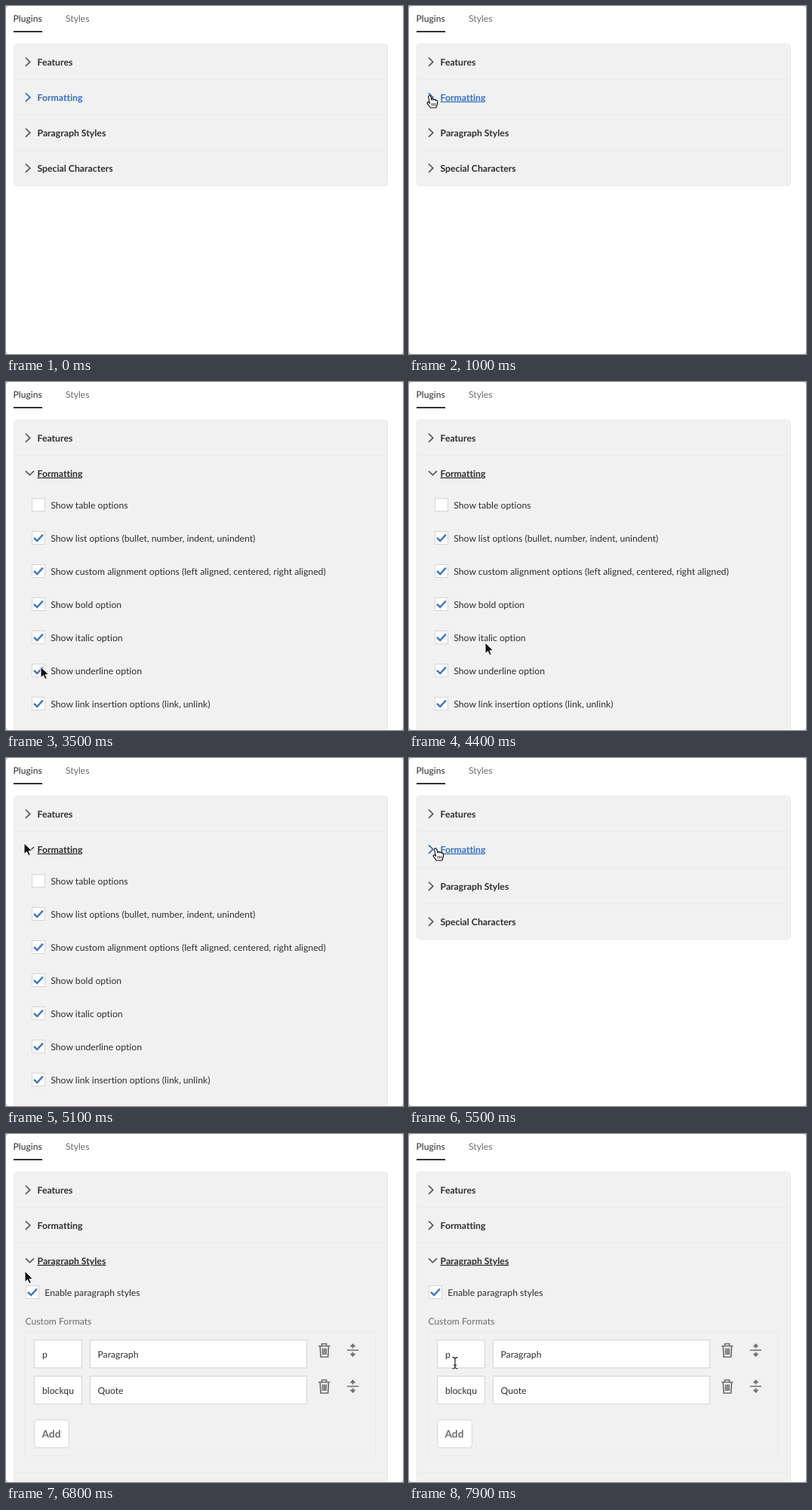
An HTML page that plays this animation: 526 px wide and 462 px high, repeating every 8 s.

```html
<!DOCTYPE html>
<html lang="en">
<head>
<meta charset="utf-8">
<title>Plugin settings</title>
<style>
  html, body { margin: 0; width: 100%; height: 100%; overflow: hidden; background: #777; }
  svg { display: block; }
  text {
    font: 12.2px Lato, "Open Sans", sans-serif; fill: #2e2e2e; white-space: pre;
    font-variant-ligatures: none; text-rendering: geometricPrecision;
  }
  .bold { font-weight: 700; }
  .muted { fill: #6e6e6e; }
  .title { font-size: 12.25px; font-weight: 700; }
  .chevron { fill: none; stroke: #5c5c5c; stroke-width: 1.7; }
  .hover .title { fill: #326ebe; }
  .hover .chevron { stroke: #326ebe; }
  .underlined .title { text-decoration: underline; }
  .divider { stroke: #eaeaea; }
  .box { fill: #fff; stroke: #d5d5d5; }
  .tick { fill: none; stroke: #4178bd; stroke-width: 2.5; }
  .icon { fill: none; stroke: #6e6e6e; stroke-width: 1.7; }
  .solid { fill: #6e6e6e; }
</style>
</head>
<body>
<svg id="stage" width="526" height="462" viewBox="0 0 526 462"></svg>
<script>
const LOOP = 8000, STEP = 100, SLIDE = 250;
const ROW = 47, TOP = 50;

const label = (x, y, text, cls = '') => `<text x="${x}" y="${y}" class="${cls}">${text}</text>`;
const box = (x, y, w, h, r = 0) =>
  `<rect class="box" x="${x + .5}" y="${y + .5}" width="${w - 1}" height="${h - 1}" rx="${r}"/>`;

const checkbox = (x, cy, text, checked = true) =>
  box(x, cy - 9, 18, 18) +
  (checked ? `<path class="tick" d="M${x + 3} ${cy - .2} l4.2 4.2 l7.7 -8.4"/>` : '') +
  label(x + 25.3, cy + 4.5, text);

const trash = y => `<path class="icon" d="M414 ${y - 5.5}h15.5 M418.5 ${y - 6}v-2.5h6v2.5
  M416.2 ${y - 5}l.8 14h9.6l.8 -14 M419.6 ${y - 2.5}v8.5 M421.8 ${y - 2.5}v8.5 M424 ${y - 2.5}v8.5"/>`;

const mover = y => `<path class="icon" d="M452 ${y}h15 M459.5 ${y - 2.5}v-4 M459.5 ${y + 2.5}v4"/>
  <path class="solid" d="M455.5 ${y - 4.5}l4 -4.5l4 4.5z M455.5 ${y + 4.5}l4 4.5l4 -4.5z"/>`;

const formatRow = (y, tag, name) =>
  box(37, y, 64, 38) + box(111, y, 288, 38) +
  label(48, y + 24, tag) + label(121.5, y + 24, name) + trash(y + 14) + mover(y + 14);

const formattingBody = [
  'Show table options',
  'Show list options (bullet, number, indent, unindent)',
  'Show custom alignment options (left aligned, centered, right aligned)',
  'Show bold option',
  'Show italic option',
  'Show underline option',
  'Show link insertion options (link, unlink)'
].map((text, i) => checkbox(34, 19 + 44 * i, text, i > 0)).join('');

const paragraphBody =
  checkbox(26, 19, 'Enable paragraph styles') +
  label(25.5, 62, 'Custom Formats', 'muted') +
  '<rect x="25.5" y="71.5" width="464" height="165" fill="none" stroke="#e9e9e9"/>' +
  formatRow(82, 'p', 'Paragraph') + formatRow(130, 'blockqu', 'Quote') +
  box(37, 188, 47, 38, 4) +
  '<text x="47.5" y="212" class="bold muted" style="font-size:13.7px">Add</text>';

// Accordion sections; "opens" and "closes" are the times at which a slide begins.
const sections = [
  { title: 'Features' },
  { title: 'Formatting', body: formattingBody, height: 350, opens: 1500, closes: 5262 },
  { title: 'Paragraph Styles', body: paragraphBody, height: 258, opens: 6013, closes: Infinity },
  { title: 'Special Characters' }
];

const sectionMarkup = (s, i) => `<g id="section${i}">
  ${i ? '<path class="divider" d="M11 .5H505"/>' : ''}
  <path class="chevron"/>${label(41.5, 28.7, s.title, 'title')}
  ${s.body ? `<svg class="body" y="${ROW}" width="526" height="0">${s.body}</svg>` : ''}</g>`;

const beam = 'M-3.5 -7.5Q0 -7.5 0 -5V5Q0 7.5 -3.5 7.5M3.5 -7.5Q0 -7.5 0 -5M0 5Q0 7.5 3.5 7.5M-2 3H2';
const cursors = {
  arrow: '<path d="M0 0V14.6L3.4 11.5L5.8 16.6L8.3 15.5L6 10.6H10.6Z" fill="#111" stroke="#fff"/>',
  hand: `<g transform="translate(-.8 -1)">
    <path d="M-2.6 1.5C-2.6 -.6 0 -.8 .6 1.2L1.8 5.4C2.4 4 4.4 4.2 4.7 5.6C5.6 4.6 7.2 5 7.3 6.4
    C8.6 5.8 9.6 6.6 9.5 8L9 12L7.6 16H.2L-3.6 11.2C-5 9.4 -3.4 8 -2 9L-.8 10Z" fill="#fff" stroke="#111" stroke-width="1.2"/>
    <path d="M2.2 10v3.5M4.4 10v3.5M6.6 10v3.5" stroke="#111" stroke-width=".9"/></g>`,
  beam: `<path d="${beam}" fill="none" stroke="#fff" stroke-width="2.6"/>
    <path d="${beam}" fill="none" stroke="#333" stroke-width="1.3"/>`
};

// Pointer path: time, x, y
const path = [
  [100, 176, 355], [300, 140, 290], [500, 70, 180], [700, 12, 118], [900, 29, 120],
  [1900, 29, 120], [2000, 31, 150], [2200, 56, 307], [2300, 56, 307], [2500, 45, 294],
  [2900, 45, 294], [3500, 46, 378], [3600, 46, 378], [4000, 105, 390], [4200, 101, 386],
  [4300, 101, 386], [4400, 101, 346], [4600, 60, 215], [4800, 6, 100], [5000, 10, 105],
  [5200, 37, 121], [5500, 37, 121], [5800, 3, 160], [6000, 29, 170], [6400, 29, 170],
  [6800, 25, 182], [6900, 25, 182], [7300, 95, 280], [7500, 98, 310], [7800, 58, 329], [7900, 61, 304]
];

const stage = document.getElementById('stage');
stage.innerHTML = `
  <rect width="526" height="462" rx="2.5" fill="#fff"/>
  ${label(9.5, 20.8, 'Plugins')}${label(79, 20.8, 'Styles', 'muted')}
  <rect x="10" y="33" width="38" height="2" fill="#323232"/>
  <rect id="panel" x="10.5" y="${TOP + .5}" width="495" rx="4" fill="#f1f1f1" stroke="#e8e8e8"/>
  ${sections.map(sectionMarkup).join('')}
  <g id="pointer">${Object.keys(cursors).map(k => `<g data-kind="${k}">${cursors[k]}</g>`).join('')}</g>`;

const panel = document.getElementById('panel');
const pointer = document.getElementById('pointer');
const nodes = sections.map((s, i) => {
  const group = document.getElementById('section' + i);
  return { group, chevron: group.querySelector('.chevron'), body: group.querySelector('.body') };
});

const clamp = v => Math.max(0, Math.min(1, v));
const swing = v => (1 - Math.cos(Math.PI * clamp(v))) / 2;
const within = (t, from, to) => t >= from && t < to;

function openHeight(s, t) {
  if (!s.body) return 0;
  const amount = swing((t - s.opens) / SLIDE) - swing((t - s.closes) / SLIDE);
  return Math.round(s.height * amount);
}

function hoveredSection(t) {
  if (t < 100 || within(t, 900, 2000) || within(t, 5200, 5600)) return 1;
  return within(t, 5900, 6600) ? 2 : -1;
}

function pointerAt(t) {
  const next = path.findIndex(p => p[0] >= t);
  if (next < 1) return path[0].slice(1);
  const [t0, x0, y0] = path[next - 1], [t1, x1, y1] = path[next];
  const k = (t - t0) / (t1 - t0);
  return [Math.round(x0 + (x1 - x0) * k), Math.round(y0 + (y1 - y0) * k)];
}

function render(t) {
  const hovered = hoveredSection(t);
  const focused = t > sections[2].opens ? 2 : t > sections[1].opens ? 1 : -1;
  let y = TOP;
  sections.forEach((s, i) => {
    const { group, chevron, body } = nodes[i];
    const height = openHeight(s, t);
    const open = s.body && t > s.opens && t < s.closes;
    group.setAttribute('transform', `translate(0 ${y})`);
    group.classList.toggle('hover', hovered === i);
    group.classList.toggle('underlined', t > 0 && (hovered === i || focused === i));
    chevron.setAttribute('d', open ? 'M26 21.2l5.5 5.4l5.5 -5.4' : 'M26 18.6l5.8 5.6l-5.8 5.6');
    if (body) {
      body.setAttribute('height', height);
      body.style.display = height ? '' : 'none';
    }
    y += ROW + height;
  });
  panel.setAttribute('height', y - TOP);

  const kind = hovered >= 0 ? 'hand' : t >= 7300 ? 'beam' : 'arrow';
  const [px, py] = pointerAt(t);
  pointer.setAttribute('transform', `translate(${px} ${py})`);
  pointer.style.display = t < 100 ? 'none' : '';
  for (const shape of pointer.children) shape.style.display = shape.dataset.kind === kind ? '' : 'none';
}

const start = performance.now();
function tick() {
  const t = (performance.now() - start) % LOOP;
  render(Math.floor(t / STEP) * STEP);
  requestAnimationFrame(tick);
}
render(0);
requestAnimationFrame(tick);
</script>
</body>
</html>
```
